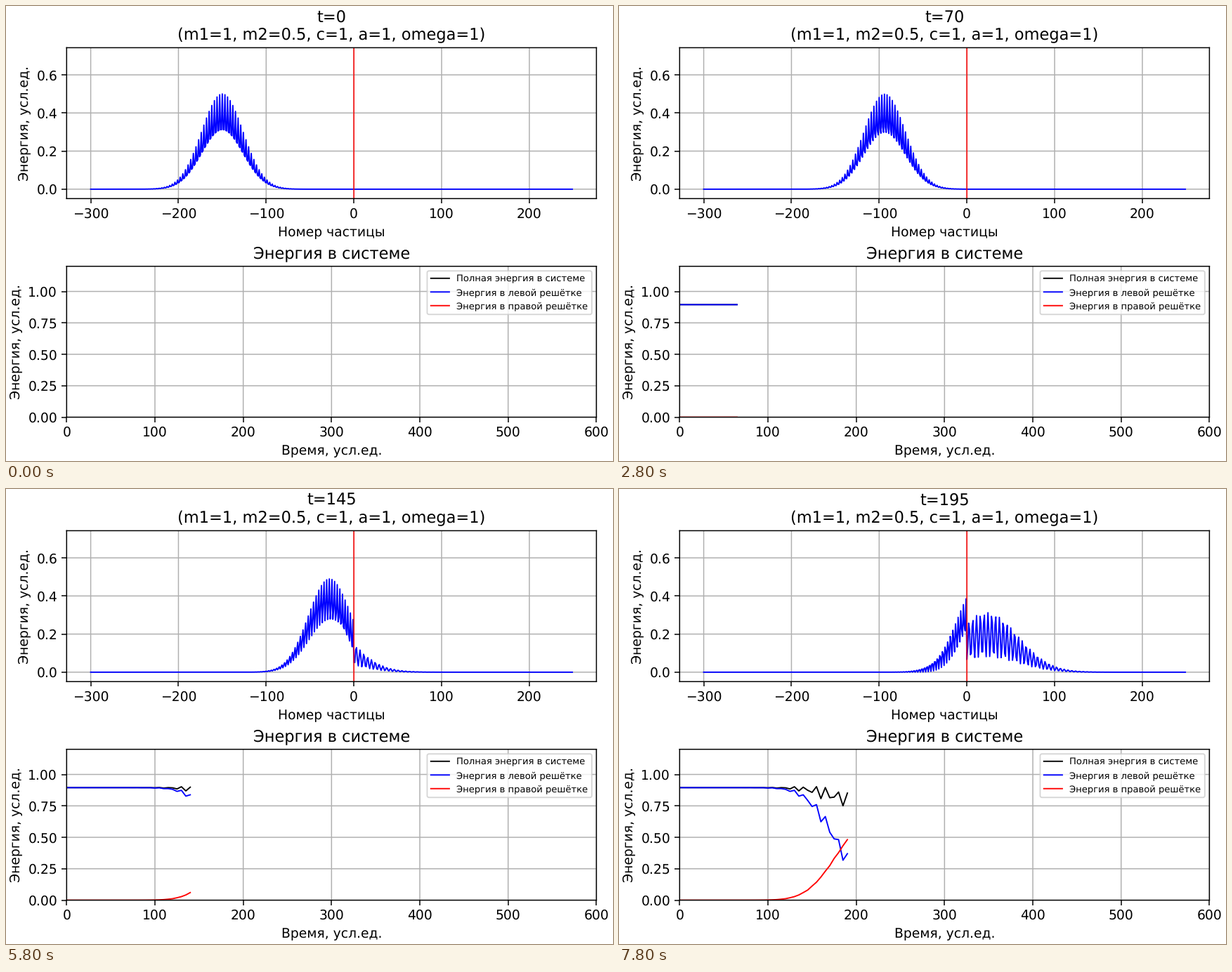
These frames come from a looping animation (864x648 px, 8000 ms). A matplotlib script:

```python
import numpy as np
import matplotlib.pyplot as plt
from matplotlib.animation import FuncAnimation

# Diatomic interface: two harmonic chains joined at n = 0
M1, M2, C, A, OMEGA = 1, 0.5, 1, 1, 1
FRAMES, STEP, INTERVAL = 40, 5, 200
DT, BETA, CENTER = 0.025, 0.03, -150
START_ENERGY = 0.895
WIDTH, HEIGHT, DPI = 864, 648, 135

plt.rcParams.update({"text.hinting": "none", "path.snap": False})

n = np.arange(-300, 250)
mass = np.where(n < 0, M1, M2)
k = 2 * np.arcsin(OMEGA / 2 * np.sqrt(M1 / C)) / A
group_speed = A * np.sqrt(C / M1) * np.cos(k * A / 2)


def force(u):
    f = np.zeros_like(u)
    f[1:-1] = C * (u[2:] - 2 * u[1:-1] + u[:-2])
    return f


def simulate():
    """Energy of every particle at t = 0, STEP, 2 * STEP, ..."""
    x = n - CENTER
    packet = np.exp(-(BETA * x) ** 2 / 2)
    u = -packet * np.sin(k * A * n)
    v = OMEGA * packet * np.cos(k * A * n) + group_speed * BETA**2 * x * u
    f = force(u)
    states = []
    for _ in range(FRAMES):
        states.append(mass * v**2 / 2 + f**2 / (4 * C))
        for _ in range(round(STEP / DT)):
            v += f / mass * DT / 2
            u += v * DT
            f = force(u)
            v += f / mass * DT / 2
    return np.array(states)


energy = simulate()
scale = START_ENERGY / energy[0].sum()
# The summed energies lag one step behind their time axis
lagged = np.vstack([energy[:1], energy[:-1]]) * scale
left = lagged[:, n < 0].sum(axis=1)
right = lagged[:, n >= 0].sum(axis=1)
times = STEP * np.arange(FRAMES)

fig = plt.figure(figsize=(WIDTH / DPI, HEIGHT / DPI), dpi=DPI)


def add_panel(y_bottom):
    """Axes whose lower edge lies y_bottom pixels below the top."""
    x0, w, h = 86.3, 754.1, 214.9
    ax = fig.add_axes([x0 / WIDTH, 1 - y_bottom / HEIGHT, w / WIDTH, h / HEIGHT])
    ax.set_ylabel("Энергия, усл.ед.")
    ax.grid()
    return ax


top, bottom = add_panel(274.3), add_panel(585.6)

wave, = top.plot(n, energy[0], "b", lw=1)
top.axvline(0, color="r", lw=0.8)
top.set_ylim(-0.0495, 0.7425)
top.set_xlabel("Номер частицы")

curves = [(left + right, "k", "Полная энергия в системе"),
          (left, "b", "Энергия в левой решётке"),
          (right, "r", "Энергия в правой решётке")]
lines = [bottom.plot([], [], color, lw=1, label=label)[0]
         for _, color, label in curves]
bottom.set_xlim(0, 600)
bottom.set_ylim(0, 1.2)
bottom.set_title("Энергия в системе")
bottom.set_xlabel("Время, усл.ед.")
bottom.legend(loc="upper right", fontsize=7)


def update(i):
    wave.set_ydata(energy[max(i - 1, 0)])
    top.set_title(f"t={STEP * i}\n(m1={M1}, m2={M2}, c={C}, a={A}, omega={OMEGA})")
    for line, (values, _, _) in zip(lines, curves):
        line.set_data(times[:i], values[:i])
    return [wave, *lines]


anim = FuncAnimation(fig, update, frames=FRAMES, interval=INTERVAL,
                     init_func=lambda: update(0), repeat=True, repeat_delay=0)
plt.show()
```
